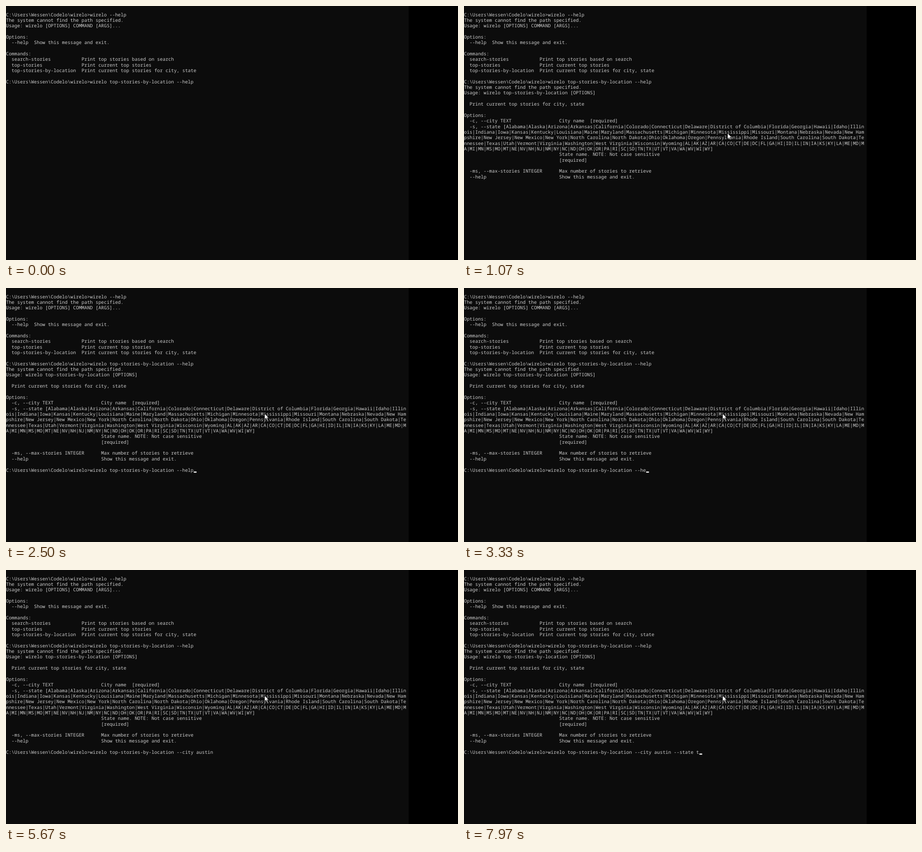
An HTML page that plays this animation: 998x561 px, repeating every 8 s.

```html
<!DOCTYPE html>
<html lang="en">
<head>
<meta charset="utf-8">
<title>Terminal session</title>
<style>
  html, body { margin: 0; width: 100%; height: 100%; overflow: hidden; background: #000; }
  svg { display: block; width: 100%; height: 100%; }
  text {
    font: 10.31px "Noto Sans Mono", "DejaVu Sans Mono", monospace;
    font-variant-ligatures: none;
    text-rendering: geometricPrecision;
    white-space: pre;
    fill: #ccc;
  }
</style>
</head>
<body>
<svg viewBox="0 0 998 561">
  <rect width="889" height="561" fill="#0c0c0c"/>
  <g id="screen"></g>
  <rect id="caret" width="6.2" height="2.6" fill="#f2f2f2"/>
  <path id="pointer" d="M0 0V12.6L3 9.8L5 14.3L7 13.4L5 9.2H9Z"
        fill="#fff" stroke="#000" stroke-width=".7"/>
</svg>
<script>
  const LOOP = 8000, BLINK = 530;
  const COLS = 143, CELL = 6.187, ROW = 12.355, BASELINE = 22.5;
  const ENTER = 200, NOTICE = 280, OUTPUT = 960, PROMPT = 1200;
  const NOTICE_ROW = 13, PROMPT_ROW = 31;

  const prompt = 'C:\\Users\\Wessen\\Codelo\\wirelo>';
  const command = 'wirelo top-stories-by-location --help';
  const notice = 'The system cannot find the path specified.';
  const entry = (name, info, width) => ('  ' + name).padEnd(width) + info;
  const option = (name, info) => entry(name, info, 34);
  const topic = (name, info) => entry(name, info, 27);

  const states = 'Alabama|Alaska|Arizona|Arkansas|California|Colorado|Connecticut|Delaware|' +
    'District of Columbia|Florida|Georgia|Hawaii|Idaho|Illinois|Indiana|Iowa|Kansas|Kentucky|' +
    'Louisiana|Maine|Maryland|Massachusetts|Michigan|Minnesota|Mississippi|Missouri|Montana|' +
    'Nebraska|Nevada|New Hampshire|New Jersey|New Mexico|New York|North Carolina|North Dakota|' +
    'Ohio|Oklahoma|Oregon|Pennsylvania|Rhode Island|South Carolina|South Dakota|Tennessee|' +
    'Texas|Utah|Vermont|Virginia|Washington|West Virginia|Wisconsin|Wyoming|' +
    'AL|AK|AZ|AR|CA|CO|CT|DE|DC|FL|GA|HI|ID|IL|IN|IA|KS|KY|LA|ME|MD|MA|MI|MN|MS|MO|MT|NE|NV|' +
    'NH|NJ|NM|NY|NC|ND|OH|OK|OR|PA|RI|SC|SD|TN|TX|UT|VT|VA|WA|WV|WI|WY';
  const wrap = s => s.match(new RegExp(`.{1,${COLS}}`, 'g'));

  const lines = [
    prompt + 'wirelo --help',
    notice,
    'Usage: wirelo [OPTIONS] COMMAND [ARGS]...',
    '',
    'Options:',
    '  --help  Show this message and exit.',
    '',
    'Commands:',
    topic('search-stories', 'Print top stories based on search'),
    topic('top-stories', 'Print current top stories'),
    topic('top-stories-by-location', 'Print current top stories for city, state'),
    '',
    prompt + command,
    notice,
    'Usage: wirelo top-stories-by-location [OPTIONS]',
    '',
    '  Print current top stories for city, state',
    '',
    'Options:',
    option('-c, --city TEXT', 'City name  [required]'),
    ...wrap(`  -s, --state [${states}]`),
    option('', 'State name. NOTE: Not case sensitive'),
    option('', '[required]'),
    '',
    option('-ms, --max-stories INTEGER', 'Max number of stories to retrieve'),
    option('--help', 'Show this message and exit.'),
    '',
    prompt
  ];

  // The command is recalled from history, trimmed, then retyped.
  const keys = [
    [2350, command],
    [3130, '\b'], [3290, '\b'], [3430, '\b'], [3560, '\b'],
    [3850, 'c'], [4000, 'i'], [4140, 't'], [4360, 'y'], [4540, ' '],
    [4720, 'a'], [4900, 'u'], [5060, 's'], [5170, 't'], [5260, 'i'], [5380, 'n'], [5790, ' '],
    [6150, '-'], [6340, '-'],
    [6760, 's'], [6900, 't'], [7030, 'a'], [7180, 't'], [7330, 'e'], [7560, ' '], [7760, 't']
  ];

  const screen = document.getElementById('screen');
  const caret = document.getElementById('caret');
  const pointer = document.getElementById('pointer');
  const show = (el, on) => el.setAttribute('visibility', on ? 'visible' : 'hidden');

  const rows = lines.map((line, i) => {
    const el = document.createElementNS('http://www.w3.org/2000/svg', 'text');
    el.setAttribute('y', BASELINE + i * ROW);
    el.textContent = line;
    return screen.appendChild(el);
  });

  function edit(t) {
    let text = '', last = -Infinity;
    for (const [time, key] of keys) {
      if (time > t) break;
      text = key === '\b' ? text.slice(0, -1) : text + key;
      last = time;
    }
    return { text, last };
  }

  function caretCell(t, input) {
    if (t < ENTER) return [NOTICE_ROW - 1, prompt.length + command.length];
    if (t < NOTICE) return [NOTICE_ROW, 0];
    if (t < OUTPUT) return [NOTICE_ROW + 1, 0];
    if (t < PROMPT) return [PROMPT_ROW - 1, 0];
    return [PROMPT_ROW, prompt.length + input.length];
  }

  function draw(t) {
    const { text, last } = edit(t);
    rows.forEach((el, i) => {
      const start = i < NOTICE_ROW ? 0 : i === NOTICE_ROW ? NOTICE : i < PROMPT_ROW ? OUTPUT : PROMPT;
      show(el, t >= start);
    });
    rows[PROMPT_ROW].textContent = prompt + text;

    const [row, col] = caretCell(t, text);
    caret.setAttribute('x', col * CELL);
    caret.setAttribute('y', BASELINE + row * ROW - .2);
    show(caret, t % (2 * BLINK) >= BLINK || t - last < 250);

    const p = Math.min(1, Math.max(0, (t - 1250) / 250));
    const ease = p * p * (3 - 2 * p);
    pointer.setAttribute('transform', `translate(${582 - 11 * ease} ${281 - 3.5 * ease})`);
    show(pointer, t >= 400);
  }

  const began = performance.now();
  function tick() {
    draw((performance.now() - began) % LOOP);
    requestAnimationFrame(tick);
  }
  tick();
</script>
</body>
</html>
```
